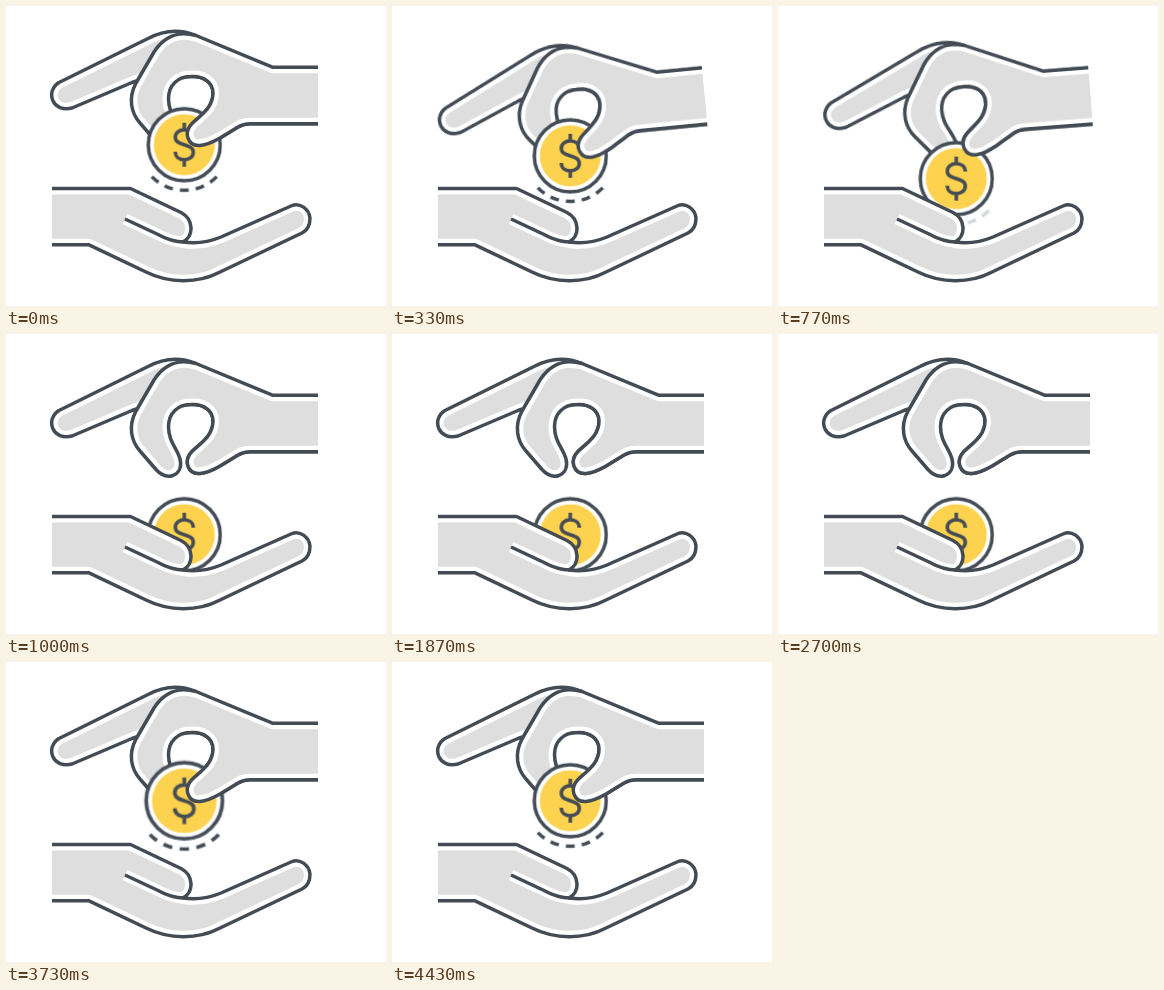
An HTML page that plays this animation: 380 px wide and 300 px high, repeating every 4510 ms.

```html
<!DOCTYPE html>
<html lang="en">
<head>
<meta charset="utf-8">
<title>Giving hands</title>
<style>
  html, body { margin: 0; width: 100%; height: 100%; overflow: hidden; background: #fff; }
  svg { display: block; width: 380px; height: 300px; }

  .line { fill: none; stroke: #434b55; stroke-width: 3.5; stroke-linejoin: round; }
  .skin { fill: #dedede; stroke: #fff; stroke-width: 12; stroke-linejoin: round; }
  .gap { fill: none; stroke: #fff; stroke-width: 11; }

  .hand, .fall, .pop, .fade, .dashes { animation: 4510ms linear infinite; }
  .hand { animation-name: dip; transform-origin: 311px 90px; }
  .fall { animation-name: fall; }
  .pop { animation-name: pop; }
  .fade { animation-name: fade; }
  .dashes { animation-name: dashes; }

  @keyframes dip {
    0%, .67% { transform: translate(0, 0) rotate(0deg); animation-timing-function: cubic-bezier(.65, 0, .35, 1); }
    11.75%, 12.64% { transform: translate(1px, .7px) rotate(-7.4deg); animation-timing-function: cubic-bezier(.65, 0, .35, 1); }
    22.2%, 100% { transform: translate(0, 0) rotate(0deg); }
  }
  @keyframes fall {
    0%, .67% { transform: translateY(0); animation-timing-function: cubic-bezier(.65, 0, .35, 1); }
    11.75%, 12.64% { transform: translateY(14.8px); animation-timing-function: cubic-bezier(.65, 0, .35, 1); }
    22.2% { transform: translateY(62px); }
    72% { transform: translateY(62px); animation-timing-function: step-start; }
    72.1%, 100% { transform: translateY(0); }
  }
  @keyframes fade {
    0%, 59.87% { opacity: 1; }
    69.7%, 72.5% { opacity: 0; }
    73.84%, 100% { opacity: 1; }
  }
  @keyframes pop {
    0%, 72% { transform: scale(1); animation-timing-function: step-start; }
    72.1%, 73.84% { transform: scale(0); animation-timing-function: cubic-bezier(.3, .3, .4, 1); }
    82.5% { transform: scale(1.06); animation-timing-function: cubic-bezier(.4, 0, .5, 1); }
    96%, 100% { transform: scale(1); }
  }
  @keyframes dashes {
    0%, 14% { opacity: 1; }
    18%, 72% { opacity: 0; }
    72.1%, 100% { opacity: 1; }
  }
</style>
</head>
<body>
<svg viewBox="0 0 380 300">
  <defs>
    <path id="finger" d="M190 29.500C172 22 157 24.500 142 32.500L53 76.500C39 85 46 107 66 102L126 76.500L175 60Z"/>
    <path id="palm" d="M330 61.300H267L190 29.500C171 24 157 32 148 46L130 77
      C122 92 125 107 134 117L150 135.500C155 141 161 143.500 167 141.500C173 139 176 133 174 125
      C171 114 162.500 108 162.500 92.500C162.500 79 172 70.500 185 70.500C198 69.500 207 77 207 87
      C207 102 195 109 186 117.500C177 127 182 140.500 194 139.500C200 139 207 136 214 132
      L232 121C236 118.500 239 117.700 244 117.700H330Z"/>
    <path id="lower" d="M30 182.500H124.500L175 206.500C188 213.500 188 230 177 236C190 238 203 236 215 231
      L285 200C294 196 303 203 304 212C304 219 302 224 296 227L213 266.500
      C192 277.500 163 277.500 140 266L82.500 238.700H30Z"/>
    <path id="crease" d="M119 213L151 228C160 233 168 236 178 236"/>

    <clipPath id="inFinger"><use href="#finger"/></clipPath>
    <clipPath id="inPalm"><use href="#palm"/></clipPath>
    <clipPath id="inLower"><use href="#lower"/></clipPath>
    <clipPath id="topCuff"><path d="M0 0H311.500V300H0Z"/></clipPath>
    <clipPath id="lowCuff"><path d="M46 0H380V300H46Z"/></clipPath>
    <clipPath id="thumbArea"><path d="M177.500 60H311.500V155H177.500Z"/></clipPath>

    <g id="palmArt">
      <use href="#palm" class="skin" clip-path="url(#inPalm)"/>
      <use href="#palm" class="line"/>
    </g>
  </defs>

  <g class="hand">
    <g clip-path="url(#topCuff)">
      <use href="#finger" class="skin" clip-path="url(#inFinger)"/>
      <use href="#finger" class="line"/>
      <use href="#palmArt"/>
    </g>
  </g>

  <g transform="translate(178.300 138.700)">
    <g class="fall"><g class="pop"><g class="fade">
      <circle class="line" r="36" style="fill: #fff"/>
      <circle r="30.500" fill="#fdd24f"/>
      <path class="line" d="M9 -7C9 -12 5 -15 0 -15S-9 -12 -9 -7.500C-9 2 9 -2 9 7.500C9 12 5 15 0 15S-9 12 -9 7
        M0 -22V-15M0 15V22"/>
      <path class="line dashes" pathLength="91" stroke-dasharray="11 9"
        d="M-32.500 31.900A45.500 45.500 0 0 0 32.500 31.900"/>
    </g></g></g>
  </g>

  <!-- The thumb closes over the coin -->
  <g class="hand">
    <g clip-path="url(#thumbArea)"><use href="#palmArt"/></g>
  </g>

  <g clip-path="url(#lowCuff)">
    <g clip-path="url(#inLower)">
      <use href="#lower" class="skin"/>
      <use href="#crease" class="gap"/>
    </g>
    <use href="#lower" class="line"/>
    <use href="#crease" class="line"/>
  </g>
</svg>
</body>
</html>
```
